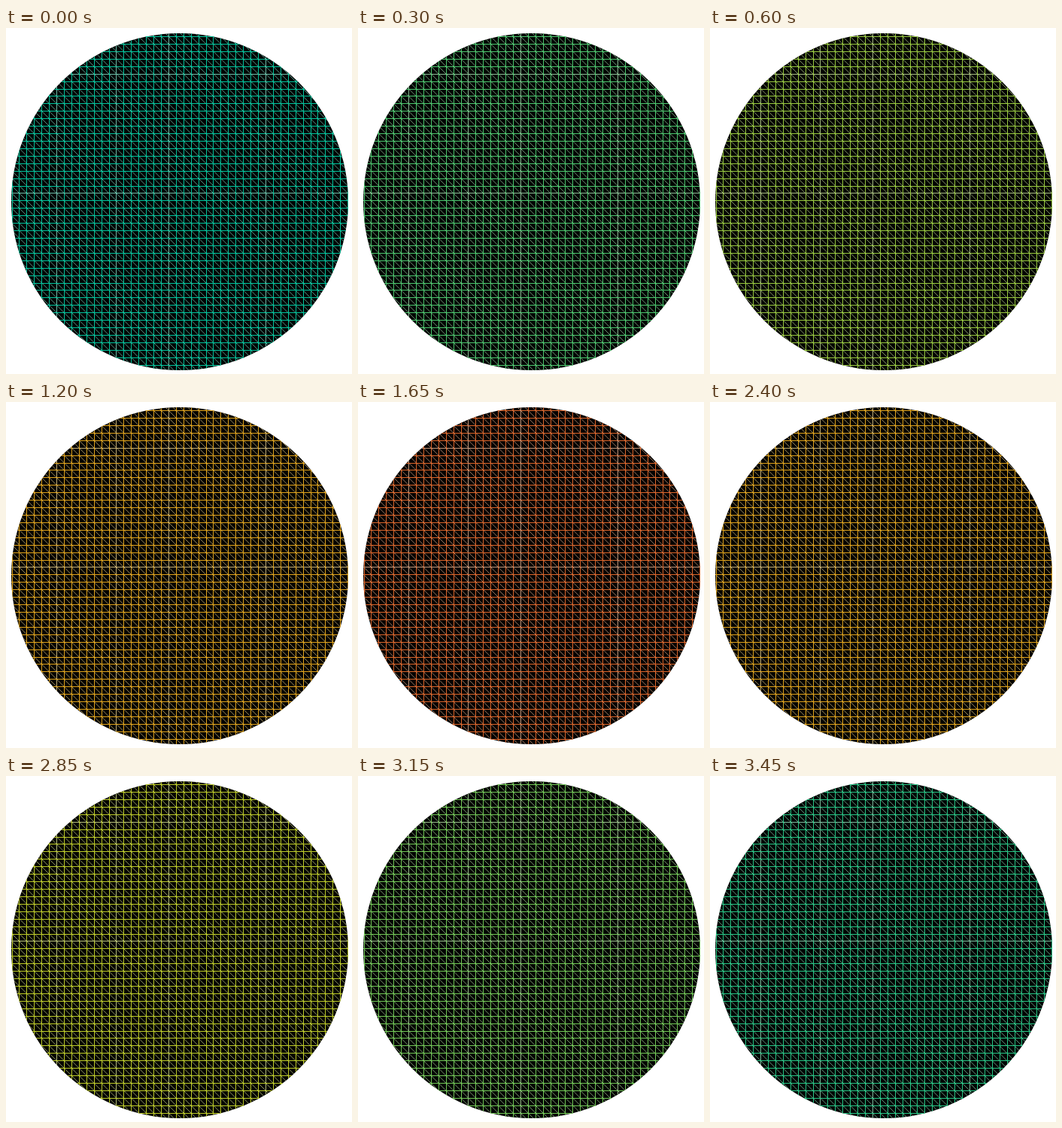
An HTML page with a canvas for the animation above (3.6 s loop, 460 px wide and 460 px high).

```html
<!DOCTYPE html>
<html>
<head>
<meta charset="utf-8">
<style>
  html, body { margin: 0; width: 100%; height: 100%; overflow: hidden; background: #fff; }
  canvas { display: block; }
</style>
</head>
<body>
<canvas id="stage" width="460" height="460"></canvas>
<script>
const ctx = document.getElementById('stage').getContext('2d');
const LOOP = 3600, STEP = 150, CELL = 9.925, LEFT = 8, TOP = 1.6;
const TEAL = [0, 200, 160], YELLOW = [232, 208, 16], RED = [224, 82, 48], PALE = [185, 190, 180];
const PALE_COLUMNS = [6, 14, 21, 34], PALE_ROWS = [6, 22];

const mix = (a, b, t) => a.map((v, i) => v + (b[i] - v) * t);
const rgb = c => `rgb(${c.map(Math.round)})`;

function gridColor(ms) {
  const p = 1 - Math.abs(1 - ms / (LOOP / 2));
  return p < 0.5 ? mix(TEAL, YELLOW, p * 2) : mix(YELLOW, RED, p * 2 - 1);
}

function draw(now) {
  const color = gridColor(Math.floor(now % LOOP / STEP) * STEP);
  const strong = rgb(color), soft = rgb(mix(color, PALE, 0.6));
  ctx.clearRect(0, 0, 460, 460);
  ctx.save();
  ctx.beginPath();
  ctx.arc(231, 231, 224, 0, Math.PI * 2);
  ctx.fillStyle = '#000';
  ctx.fill();
  ctx.clip();

  // Diagonals join the corners of the cells.
  ctx.beginPath();
  for (let k = -46; k <= 46; k++) {
    const y = TOP + k * CELL;
    ctx.moveTo(LEFT, y);
    ctx.lineTo(LEFT + 460, y + 460);
  }
  ctx.strokeStyle = soft;
  ctx.lineWidth = 0.8;
  ctx.stroke();

  for (let k = 0; k < 46; k++) {
    ctx.fillStyle = PALE_ROWS.includes(k) ? soft : strong;
    ctx.fillRect(0, Math.floor(TOP + k * CELL), 460, 1);
    ctx.fillStyle = PALE_COLUMNS.includes(k) ? soft : strong;
    ctx.fillRect(Math.floor(LEFT + k * CELL), 0, 1, 460);
  }
  ctx.restore();
}

function tick() {
  draw(performance.now());
  requestAnimationFrame(tick);
}
tick();
</script>
</body>
</html>
```
